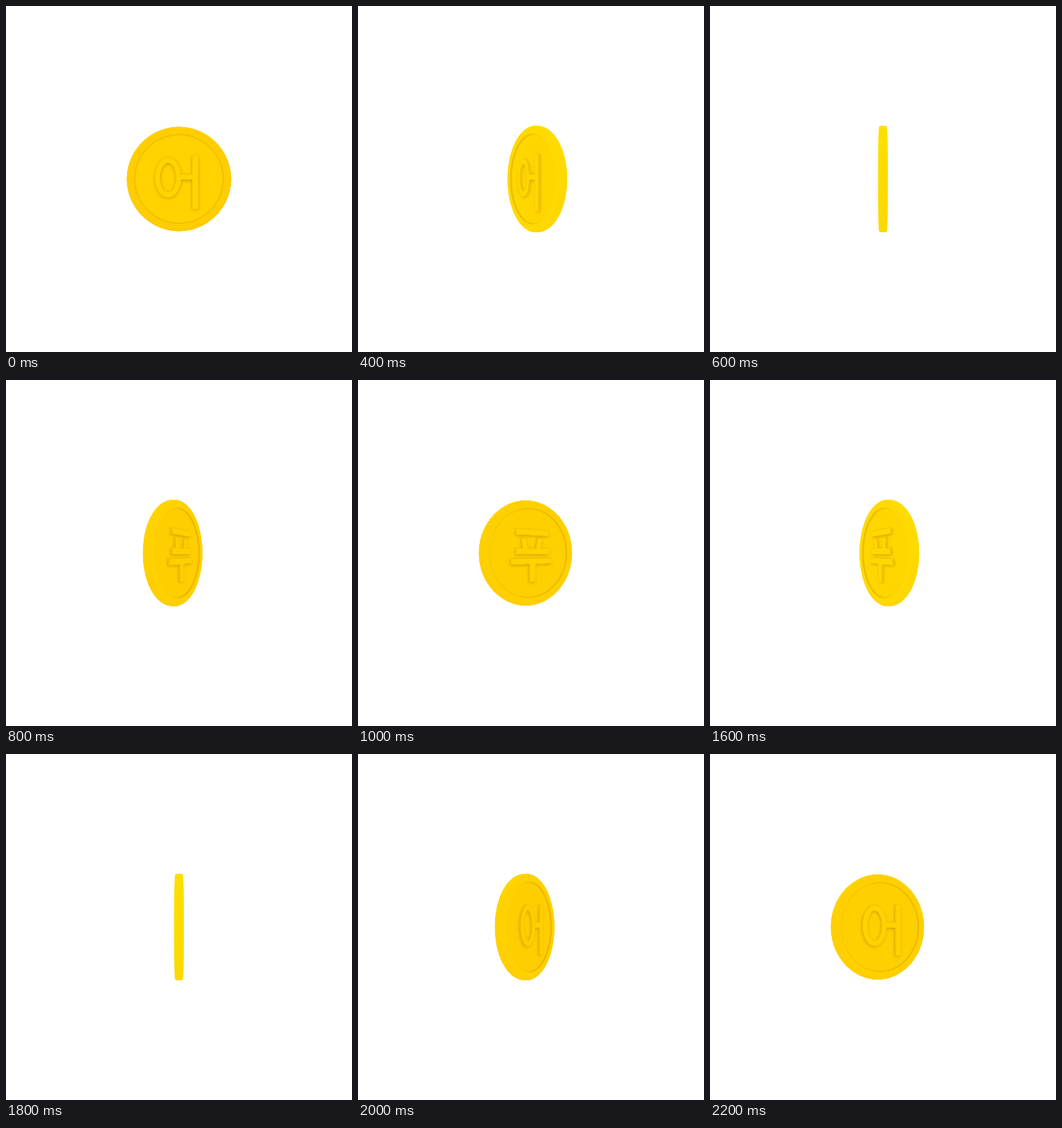
These frames come from a looping animation (500 px wide and 500 px high, 2.4 s). An HTML page with a canvas:

```html
<!DOCTYPE html>
<html lang="ko">
<head>
<meta charset="utf-8">
<title>Spinning coin</title>
<style>
html, body { margin: 0; width: 100%; height: 100%; overflow: hidden; background: #fff; }
canvas { display: block; }
</style>
</head>
<body>
<canvas id="stage" width="500" height="500"></canvas>
<script>
const ctx = document.getElementById('stage').getContext('2d');
const DIST = 280, RADIUS = 74.2, HALF = 5, BEVEL = 1.8, FLOOR = 2.8, WELL = 63.6;
const STEP = 200, STEPS = 12;
let sin = 0, cos = 1;

const rgb = (r, g) => `rgb(${r},${g},0)`;

// Point on the coin: a across, b down, h out of the visible face
function project(a, b, h) {
  const k = DIST / (DIST - a * sin - h * cos);
  return [250 + (a * cos - h * sin) * k, 250 + b * k];
}

function oval(cx, cy, rx, ry) {
  return Array.from({ length: 90 }, (_, i) => {
    const t = i * Math.PI / 45;
    return [cx + rx * Math.cos(t), cy + ry * Math.sin(t)];
  });
}
const disc = r => oval(0, 0, r, r);
const quad = (l, t, r, b) => [[l, t], [r, t], [r, b], [l, b]];

// Each shape is a list of outlines; a second outline is a hole
const EO = [
  [oval(-15.5, -2, 18.5, 28), oval(-15.5, -2, 11.5, 21)],
  [quad(2, -6.5, 21, 1)],
  [quad(19, -33, 27.5, 42.5)]
];
const PU = [
  [quad(-26, -33, 28, -25.5)],
  [[[-18, -21], [-10.5, -21], [-8.5, -5], [-15, -5]]],
  [[[8.5, -21], [16.5, -21], [13, -5], [6, -5]]],
  [quad(-26, -6.5, 27, 1.5)],
  [quad(-33.5, 8, 33, 15.5)],
  [quad(-4.5, 15, 4.5, 41)]
];

function trace(outlines, h) {
  ctx.beginPath();
  for (const points of outlines) {
    points.forEach(([a, b], i) => ctx[i ? 'lineTo' : 'moveTo'](...project(a, b, h)));
    ctx.closePath();
  }
}
function fill(outlines, h, color) {
  trace(outlines, h);
  ctx.fillStyle = color;
  ctx.fill('evenodd');
}
function shade(outlines, width, alpha) {
  trace(outlines, FLOOR);
  ctx.lineWidth = width;
  ctx.strokeStyle = `rgba(190,135,0,${alpha})`;
  ctx.stroke();
}

function drawBody(green) {
  const side = ctx.createLinearGradient(0, 172, 0, 328);
  side.addColorStop(0, rgb(255, green + 4));
  side.addColorStop(1, rgb(255, green - 4));
  ctx.strokeStyle = side;
  for (let h = -HALF; h <= HALF + 0.01; h += 0.2) {
    fill([disc(RADIUS - BEVEL * (h / HALF) ** 4)], h, side);
    ctx.lineWidth = 0.5;
    ctx.stroke();
  }
}

function drawFace(glyph, green, tilt) {
  const wall = rgb(242, green - 16), face = rgb(255, green);
  fill([disc(RADIUS - BEVEL)], HALF, rgb(255, green - 5 + 9 * tilt));

  ctx.save();
  trace([disc(WELL)], HALF);
  ctx.clip();
  fill([disc(WELL)], HALF, wall);
  fill([disc(WELL)], FLOOR, face);
  shade([disc(WELL)], 4, 0.08);
  shade([disc(WELL)], 2, 0.16);

  // Soft contact shadow, falling slightly downwards
  ctx.shadowColor = 'rgba(170,110,0,0.5)';
  ctx.shadowBlur = 5;
  ctx.shadowOffsetY = 1.5;
  for (const shape of glyph) fill(shape, FLOOR, wall);
  ctx.restore();

  for (const shape of glyph) shade(shape, 2, 0.2);
  for (let h = FLOOR; h < HALF; h += 0.15)
    for (const shape of glyph) fill(shape, h, wall);
  for (const shape of glyph) fill(shape, HALF, rgb(255, green + 2));
}

function draw(step) {
  const back = step > 3 && step < 10;
  const quarter = (step + 2) % 6 - 2;
  const angle = quarter * Math.PI / 6;
  const edge = quarter === 3;
  sin = Math.sin(angle);
  cos = Math.cos(angle);
  const green = Math.round(210 + 1.8 * quarter), tilt = Math.abs(sin);
  ctx.clearRect(0, 0, 500, 500);
  drawBody(green - 6 + 10 * tilt);
  if (!edge) drawFace(back ? PU : EO, green, tilt);
}

let shown = -1;
function tick() {
  const step = Math.floor(performance.now() / STEP) % STEPS;
  if (step !== shown) draw(shown = step);
  requestAnimationFrame(tick);
}
tick();
</script>
</body>
</html>
```
